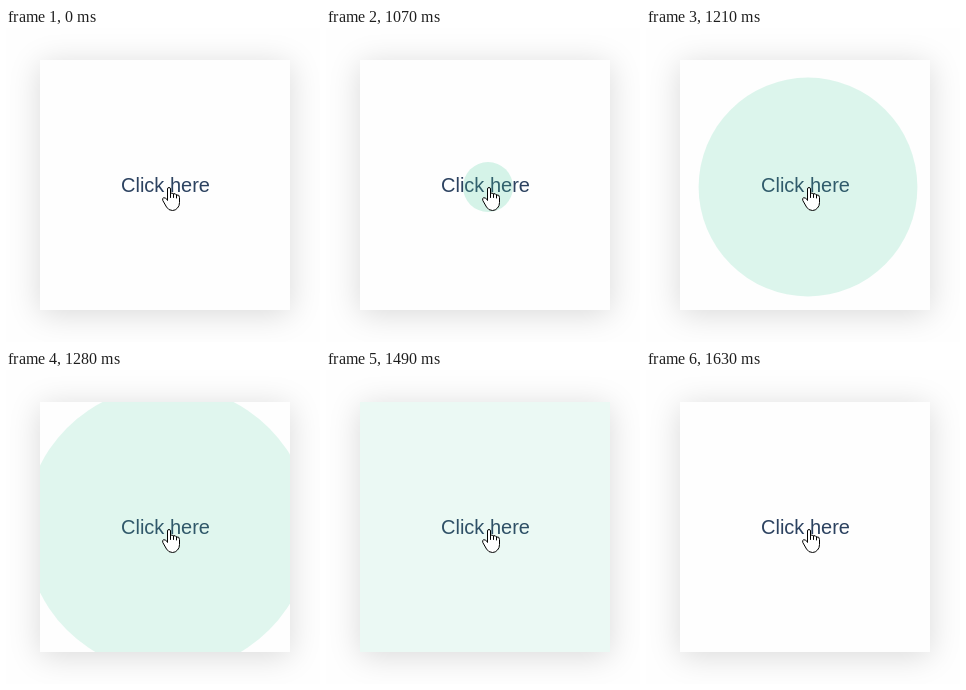
Write an HTML page that moves like this. It is 314 by 314 pixels and loops after 1700 ms.

```html
<!DOCTYPE html>
<html lang="en">
<head>
<meta charset="utf-8">
<title>Click ripple</title>
<style>
  html, body { margin: 0; width: 100%; height: 100%; overflow: hidden; background: #fefefe; }
  .card {
    position: absolute; left: 34px; top: 32px; width: 250px; height: 250px;
    background: #fefefe; box-shadow: 0 4px 30px rgba(0, 0, 0, .15);
  }
  svg { position: absolute; left: 0; top: 0; width: 314px; height: 314px; }
  text { font: 20px "Liberation Sans", Arial, sans-serif; fill: #2c4260; }
</style>
</head>
<body>
<div class="card"></div>
<svg viewBox="0 0 314 314">
  <clipPath id="cardClip"><rect x="34" y="32" width="250" height="250"/></clipPath>
  <text x="159.5" y="164" text-anchor="middle">Click here</text>
  <g clip-path="url(#cardClip)">
    <circle id="ripple" cx="162" cy="159" r="0" fill="rgb(70,205,155)"/>
  </g>
  <!-- hand pointer -->
  <g fill="#fff" stroke="#000" stroke-linejoin="round" stroke-linecap="round">
    <path d="M161.5 172V161Q161.5 159.5 163 159.5T164.5 161V165.5Q166 164.2 167.5 166
             Q169.3 164.8 170.5 167Q173.5 166.3 173.5 169.5V174.5Q173.5 178 171.5 180
             Q169.5 182.5 166.5 182.5Q162.5 182.5 160.5 179L156.8 172.5
             Q156 170 157.8 169.7Q159.5 169.5 161.5 172Z"/>
    <path d="M164.5 165.5V169.5M167.5 166V169.5M170.5 167V170" fill="none"/>
  </g>
</svg>
<script>
  const LOOP = 1700, START = 1070, END = 1560, STEP = 70;
  const ripple = document.getElementById('ripple');
  const origin = performance.now();

  function draw(now) {
    const time = Math.max(0, now - origin) % LOOP;
    const visible = time >= START && time < END;
    const step = visible ? Math.floor((time - START) / STEP) : 0;
    // Decelerating growth with a linear fade.
    ripple.setAttribute('r', visible ? 25 + 48 * step - 2.9 * step * step : 0);
    ripple.setAttribute('opacity', 0.22 - 0.02 * step);
    requestAnimationFrame(draw);
  }
  draw(origin);
</script>
</body>
</html>
```
